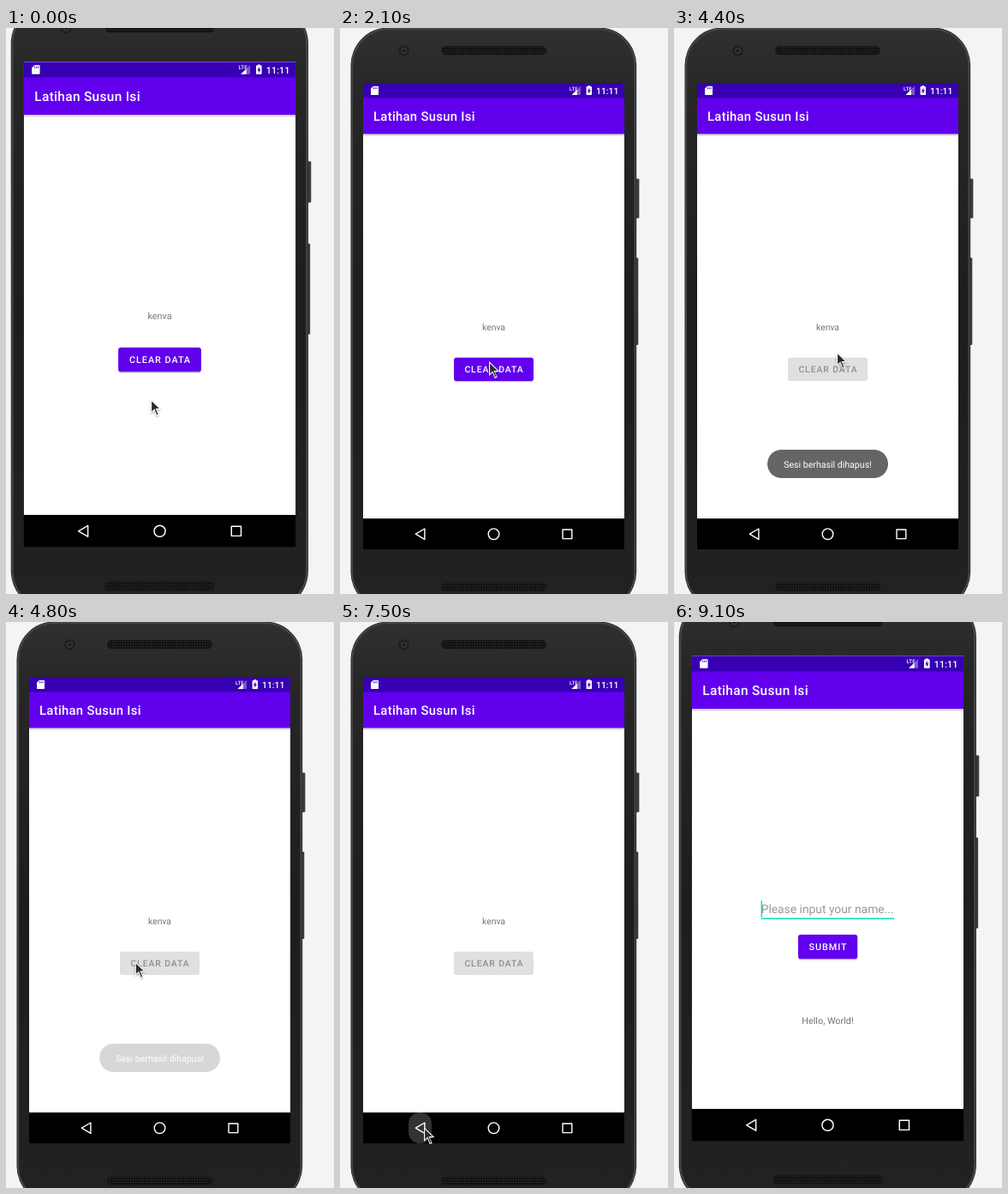
An HTML page for the animation above (9300 ms loop, 383 by 659 pixels).

```html
<!DOCTYPE html>
<html lang="id">
<head>
<meta charset="utf-8">
<title>Clear data demo</title>
<style>
  html, body { margin: 0; width: 100%; height: 100%; overflow: hidden; background: #f4f4f4; }
  svg { display: block; width: 100%; height: 100%; }
  text { font-family: Roboto, "Noto Sans", sans-serif; font-size: 10.4px; text-rendering: geometricPrecision; }
  .mid { text-anchor: middle; }
  .title { font-size: 14.84px; font-weight: 500; letter-spacing: .3px; fill: #fff; }
  .label { font-weight: 500; letter-spacing: .93px; fill: #fff; }
  .body { fill: #757575; }
  .hint { font-size: 13.3px; fill: #999; }
  .nav { fill: none; stroke: #fff; stroke-width: 1.4; stroke-linejoin: round; }
  #cursor { filter: drop-shadow(0 1px 1px rgba(0,0,0,.35)); }
</style>
</head>
<body>
<svg viewBox="0 0 383 659" preserveAspectRatio="none">
  <defs>
    <linearGradient id="shell" x1="0" y1="0" x2="0" y2="1">
      <stop offset="0" stop-color="#303030"/>
      <stop offset=".12" stop-color="#262626"/>
      <stop offset=".5" stop-color="#1d1d1d"/>
      <stop offset="1" stop-color="#222"/>
    </linearGradient>
    <linearGradient id="shade" x1="0" y1="0" x2="0" y2="1">
      <stop offset="0" stop-color="#000" stop-opacity=".28"/>
      <stop offset="1" stop-color="#000" stop-opacity="0"/>
    </linearGradient>
    <pattern id="mesh" width="3" height="3" patternUnits="userSpaceOnUse">
      <rect width="3" height="3" fill="#121212"/>
      <circle cx="1.5" cy="1.5" r=".8" fill="#2c2c2c"/>
    </pattern>
    <clipPath id="appClip"><rect x="27" y="64" width="305" height="508"/></clipPath>
    <clipPath id="buttonClip"><rect x="133" y="383.7" width="93" height="27.3" rx="3"/></clipPath>
    <g id="bars">
      <rect x="27" y="64" width="305" height="508" fill="#fff"/>
      <rect x="27" y="123" width="305" height="3.5" fill="url(#shade)"/>
      <rect x="27" y="64" width="305" height="18" fill="#3700b3"/>
      <rect x="27" y="81.5" width="305" height="41.8" fill="#6200ee"/>
      <text class="title" x="39" y="108.3">Latihan Susun Isi</text>
    </g>
  </defs>

  <g id="phone">
    <rect x="344" y="175.5" width="5.4" height="46" rx="1" fill="#3c3c3c"/>
    <rect x="344" y="267.5" width="4.3" height="101.5" rx="1" fill="#3c3c3c"/>
    <rect x="12.5" y="-.5" width="333.7" height="678" rx="44" fill="#242424"/>
    <rect x="14.2" y="1.2" width="330.3" height="674.6" rx="42.3" fill="url(#shell)" stroke="#484848" stroke-width="1.8"/>
    <circle cx="74.5" cy="26.5" r="6.5" fill="#202020"/>
    <circle cx="74.5" cy="26.5" r="3.6" fill="#353535"/>
    <circle cx="74.5" cy="26.5" r="1.7" fill="#181818"/>
    <rect x="118" y="21" width="123" height="10.5" rx="5" fill="url(#mesh)"/>
    <rect x="118" y="645.5" width="123" height="10.5" rx="5" fill="url(#mesh)"/>

    <g clip-path="url(#appClip)">
      <g id="form">
        <use href="#bars"/>
        <text class="hint" x="104.7" y="352.2">Please input your name...</text>
        <rect x="105" y="357.4" width="149" height="1.5" fill="#03dac5"/>
        <rect id="caret" x="104.6" y="338" width="1.3" height="18.5" fill="#03dac5"/>
        <rect x="146.6" y="377.2" width="66" height="27.3" rx="3" fill="#000" opacity=".2"/>
        <rect x="146.3" y="376" width="66.6" height="27.3" rx="3" fill="#6200ee"/>
        <text class="label mid" x="180" y="393.4">SUBMIT</text>
        <text class="body mid" x="179.5" y="475.7">Hello, World!</text>
      </g>
      <g id="session">
        <use href="#bars"/>
        <text class="body mid" x="179.5" y="351.6">kenva</text>
        <rect id="lift" x="133.3" y="385" width="92.4" height="27.3" rx="3" fill="#000" opacity=".2"/>
        <rect id="button" x="133" y="383.7" width="93" height="27.3" rx="3"/>
        <circle id="press" cx="175" cy="390" fill="#fff" opacity=".24" clip-path="url(#buttonClip)"/>
        <text id="clear" class="label mid" x="180" y="401.3">CLEAR DATA</text>
      </g>
    </g>

    <g fill="#fff">
      <path d="M39 67.8h5.2q.8 0 .8.8v8.6q0 .8-.8.8h-7.4q-.8 0-.8-.8v-6.6z"/>
      <path d="M39.3 69.2v2M41.2 69.2v2M43.1 69.2v2" stroke="#3700b3" stroke-width=".9"/>
      <text x="268" y="72.8" style="font-size:6px;font-weight:500">LTE</text>
      <path d="M281 67.5V78h-10.5l4.5-4.5h2v-2z" opacity=".35"/>
      <path d="M276.8 71.8V78h-6.3z"/>
      <path d="M289.5 67h2.6v1.1h1.2q.7 0 .7.7v8.5q0 .7-.7.7h-5q-.7 0-.7-.7v-8.5q0-.7.7-.7h1.2z"/>
      <path d="M291.4 69.6l-2.5 4.1h1.5v3l2.5-4.1h-1.5z" fill="#3700b3"/>
      <text x="299" y="77" style="font-weight:500">11:11</text>
    </g>

    <rect x="27" y="571.1" width="305" height="35.9" fill="#000"/>
    <rect id="backPress" x="80" y="571" width="27" height="36" rx="13" fill="#fff"/>
    <path class="nav" d="M88.3 589.2l10.6-6.2v12.4z"/>
    <circle class="nav" cx="179.5" cy="589.2" r="6.3"/>
    <rect class="nav" x="260" y="584" width="10.8" height="10.6"/>

    <g id="toast">
      <rect x="109" y="491" width="141" height="33" rx="16.5" fill="#656565"/>
      <text class="mid" x="179.5" y="511.7" style="font-size:10.6px" fill="#fff">Sesi berhasil dihapus!</text>
    </g>
  </g>

  <g id="cursor">
    <path d="M0 0V17l4-3.7L6.8 20l2.9-1.2-2.8-6.4L12.4 12z" fill="#fff"/>
    <path d="M1.1 2.5v12.1l3.2-3.1 2.9 6.9 1.3-.6-2.9-6.8 4.3-.1z" fill="#2b2b2b"/>
  </g>
</svg>
<script>
const LOOP = 9300, STEP = 100;
const ZOOM = "translate(179.5 -27.3) scale(1.0405) translate(-179.5 0)";

// time, x, y of the pointer tip
const pointer = [
  [200, 169, 432], [800, 174, 388],
  [2800, 174, 388], [3000, 160, 400], [3100, 151, 395],
  [3600, 151, 395], [3800, 192, 389],
  [4000, 192, 389], [4400, 190, 377], [4500, 186, 375], [4900, 139, 402],
  [5600, 139, 402], [5900, 195, 398],
  [6100, 195, 398], [6200, 216, 389], [6600, 150, 500], [6900, 70, 590],
  [7000, 84, 593], [7100, 104, 590], [7200, 98, 588],
  [8200, 98, 588], [8300, 97, 569], [8800, 140, -30]
];
const toastFade = [[2500, 0], [2600, 1], [4500, 1], [4900, 0]];
const backFade = [[7400, 0], [7500, .2], [7600, .2], [7900, 0]];
const leave = [[7500, 0], [7900, 1]];
const pressSize = [[2100, 0], [2200, 35], [2300, 60]];

const el = id => document.getElementById(id);
const set = (id, attrs) => {
  for (const name in attrs) el(id).setAttribute(name, attrs[name]);
};

// Linear value of one column in a table of keys
function at(keys, t, col = 1) {
  const i = keys.findIndex(k => k[0] > t);
  if (i === 0) return keys[0][col];
  if (i < 0) return keys[keys.length - 1][col];
  const a = keys[i - 1], b = keys[i];
  return a[col] + (b[col] - a[col]) * (t - a[0]) / (b[0] - a[0]);
}

function draw(time) {
  const t = Math.floor(time / STEP) * STEP;
  const disabled = t >= 2400;
  const gone = at(leave, t);

  set("phone", { transform: t < 2100 || t >= 9000 ? ZOOM : "" });
  set("cursor", { transform: `translate(${at(pointer, t)} ${at(pointer, t, 2)})` });
  set("session", { opacity: 1 - gone, transform: `translate(0 ${43 * gone * gone})` });
  set("lift", { opacity: disabled ? 0 : .2 });
  set("button", { fill: disabled ? "#e0e0e0" : "#6200ee" });
  el("clear").style.fill = disabled ? "#8f8f8f" : "#fff";
  set("press", { r: disabled ? 0 : at(pressSize, t) });
  set("toast", { opacity: at(toastFade, t) });
  set("backPress", { opacity: at(backFade, t) });
  set("caret", { opacity: t < 8100 || t >= 8600 ? 1 : 0 });
}

const start = performance.now();
function tick() {
  draw((performance.now() - start) % LOOP);
  requestAnimationFrame(tick);
}
tick();
</script>
</body>
</html>
```
